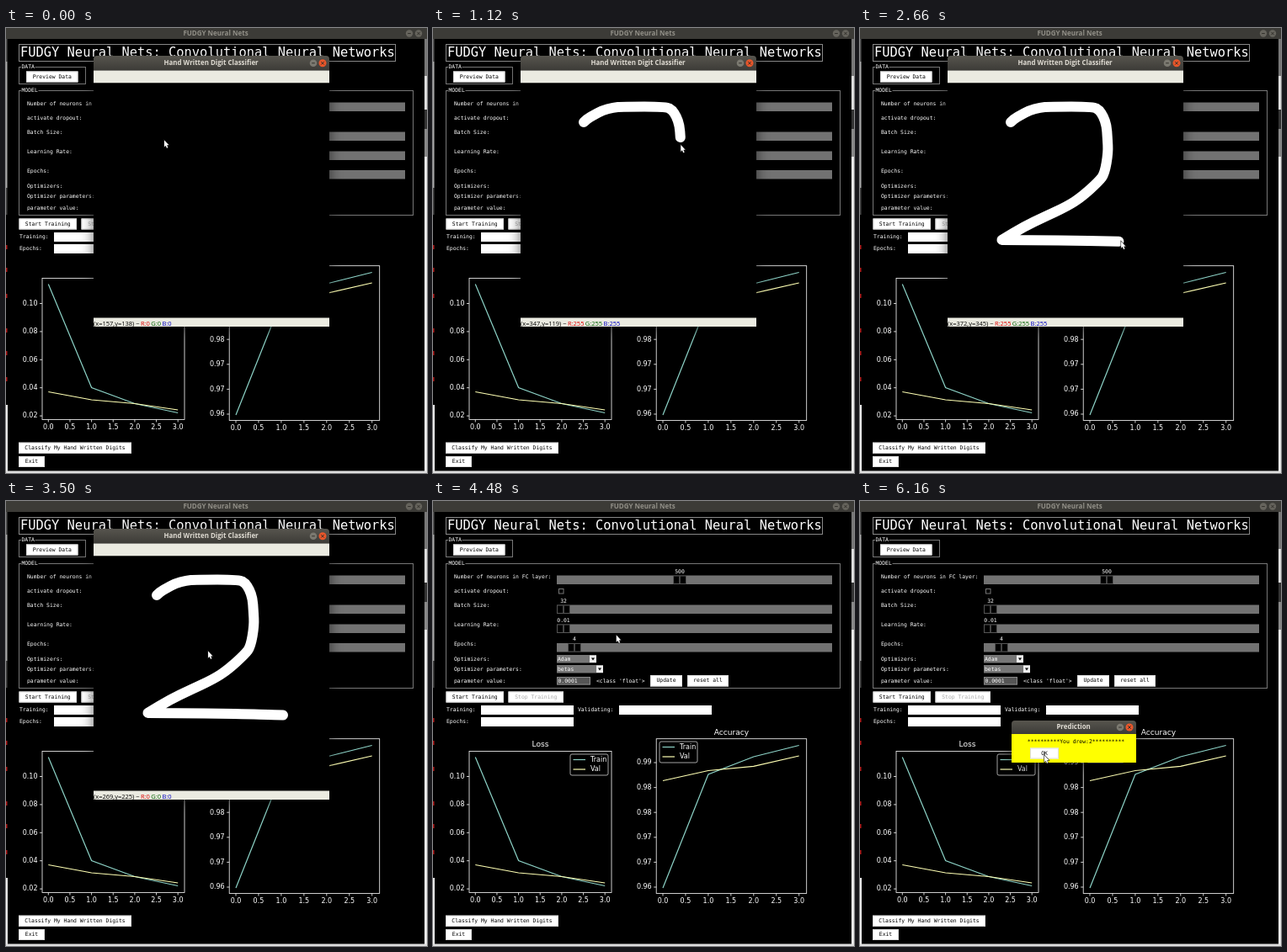
These frames come from a looping animation (500 px wide and 529 px high, 6370 ms). An HTML page with a canvas:

```html
<!DOCTYPE html>
<html lang="en">
<head>
<meta charset="utf-8">
<title>Digit classifier demo</title>
<style>
  html, body { margin: 0; width: 100%; height: 100%; overflow: hidden; background: #000; }
  canvas { display: block; width: 500px; height: 529px; }
</style>
</head>
<body>
<canvas id="stage"></canvas>
<script>
const W = 500, H = 529, LOOP = 6370, STEP = 70;
const canvas = document.getElementById('stage');
const ratio = window.devicePixelRatio || 1;
canvas.width = W * ratio;
canvas.height = H * ratio;
const ctx = canvas.getContext('2d');
ctx.scale(ratio, ratio);

const MONO = '"DejaVu Sans Mono", monospace';
const UI = '6.4px ' + MONO;
const PLOT = '8px "DejaVu Sans", sans-serif';
const PLOT_TITLE = '9.1px "DejaVu Sans", sans-serif';
const BAR = 'bold 7.9px "Open Sans", sans-serif';
const STATUS = '7.5px "Open Sans", sans-serif';
const TEAL = '#8dd3c7', YELLOW = '#feffb3', CREAM = '#ebebe1';

// Pen positions as [x, y, time]; the pointer runs slightly ahead of the ink.
const LEAD = 35, INK_START = 385, INK_END = 2940;
const PATH = [
  [189.86, 140.47, 0], [188, 133.5, 35], [188, 133.5, 70], [179, 112, 245],
  [179, 112, 385], [183, 108, 430], [191, 103.5, 490], [201, 98, 550],
  [214, 94.5, 620], [225, 93.5, 680], [277, 93.5, 900], [284, 97.5, 950],
  [289, 105, 1000], [292.8, 116, 1055], [293.8, 130.08, 1120],
  [294.8, 148, 1190], [290.5, 173, 1300], [284, 182, 1345], [263, 201, 1460],
  [246, 212, 1540], [218, 225, 1655], [195, 236, 1760], [168.5, 252, 1890],
  [168.5, 252, 2065], [235, 252.3, 2370], [307.4, 253.7, 2660], [329, 254.6, 2940],
  [329, 254.6, 3255], [217.8, 159.6, 3605], [217.8, 159.6, 5075],
  [211.5, 154.5, 5145], [187, 147, 5215], [187, 147, 5285],
  [213, 316, 5775], [219, 302.5, 5985]
];

function pointAt(t) {
  for (let i = 1; i < PATH.length; i++) {
    const [x0, y0, t0] = PATH[i - 1], [x1, y1, t1] = PATH[i];
    if (t <= t1) {
      const k = Math.max(0, (t - t0) / (t1 - t0));
      return [x0 + (x1 - x0) * k, y0 + (y1 - y0) * k];
    }
  }
  return PATH[PATH.length - 1];
}

function fill(x, y, w, h, color) {
  ctx.fillStyle = color;
  ctx.fillRect(x, y, w, h);
}

function frame(x, y, w, h, color, width = 1) {
  ctx.strokeStyle = color;
  ctx.lineWidth = width;
  ctx.strokeRect(x, y, w, h);
}

function text(str, x, y, font = UI, color = '#fff', align = 'left', base = 'middle') {
  ctx.font = font;
  ctx.fillStyle = color;
  ctx.textAlign = align;
  ctx.textBaseline = base;
  ctx.fillText(str, x, y);
}

function line(points, color, width) {
  ctx.beginPath();
  points.forEach(([x, y]) => ctx.lineTo(x, y));
  ctx.strokeStyle = color;
  ctx.lineWidth = width;
  ctx.stroke();
}

function disc(x, y, r, color) {
  ctx.beginPath();
  ctx.arc(x, y, r, 0, Math.PI * 2);
  ctx.fillStyle = color;
  ctx.fill();
}

function button(label, x, y, w, h, color = '#000') {
  fill(x, y, w, h, '#fff');
  frame(x + .5, y + .5, w - 1, h - 1, '#ddd');
  text(label, x + w / 2, y + h / 2, UI, color, 'center');
}

function group(label, x, y, w, h) {
  frame(x + .5, y + .5, w, h, '#777');
  fill(x + 3, y - 3, label.length * 3.9 + 1, 7, '#000');
  text(label, x + 3.5, y);
}

function slider(y, handle, value) {
  fill(147, y, 327, 10.5, '#727272');
  fill(handle, y, 16, 10.5, '#000');
  frame(handle + .5, y + .5, 15, 9.5, '#555');
  fill(handle + 7.5, y + 1, 1, 8.5, '#888');
  text(value, handle + 8, y - 4.5, UI, '#fff', 'center');
}

function combo(label, y, w) {
  fill(147, y, w, 9.5, '#777');
  text(label, 148, y + 5);
  fill(147 + w - 8, y + .5, 8, 8.5, '#eee');
  const x = 147 + w - 4;
  ctx.beginPath();
  ctx.moveTo(x - 2, y + 3.5);
  ctx.lineTo(x + 2, y + 3.5);
  ctx.lineTo(x, y + 6.5);
  ctx.fillStyle = '#000';
  ctx.fill();
}

function windowButton(x, y, r, color, kind) {
  disc(x, y, r, color);
  ctx.beginPath();
  ctx.moveTo(x - 1.8, y - (kind === 'x' ? 1.8 : 0));
  ctx.lineTo(x + 1.8, y + (kind === 'x' ? 1.8 : 0));
  if (kind === 'x') {
    ctx.moveTo(x + 1.8, y - 1.8);
    ctx.lineTo(x - 1.8, y + 1.8);
  }
  ctx.strokeStyle = '#33312c';
  ctx.lineWidth = 1;
  ctx.stroke();
}

function titleBar(label, x, y, w, h) {
  const g = ctx.createLinearGradient(0, y, 0, y + h);
  g.addColorStop(0, '#57554e');
  g.addColorStop(1, '#3c3b37');
  ctx.beginPath();
  ctx.roundRect(x, y, w, h, [4, 4, 0, 0]);
  ctx.fillStyle = g;
  ctx.fill();
  text(label, x + w / 2 - .4, y + h / 2, BAR, '#dfdbd2', 'center');
  windowButton(x + w - 19, y + h / 2, 4.3, '#7b7970', '-');
  windowButton(x + w - 8, y + h / 2, 4.5, '#e9562a', 'x');
}

function shadow(x, y, w, h) {
  ctx.save();
  ctx.shadowColor = 'rgba(0,0,0,.6)';
  ctx.shadowBlur = 14 * ratio;
  ctx.shadowOffsetY = 3 * ratio;
  fill(x, y + 4, w, h - 4, '#000');
  ctx.restore();
}

function legend(x, y) {
  ctx.beginPath();
  ctx.roundRect(x, y, 45, 25, 2);
  ctx.fillStyle = '#000';
  ctx.fill();
  ctx.strokeStyle = '#ccc';
  ctx.lineWidth = .8;
  ctx.stroke();
  [['Train', TEAL], ['Val', YELLOW]].forEach(([name, color], i) => {
    const ly = y + 6.5 + i * 11.5;
    line([[x + 3.5, ly], [x + 18, ly]], color, 1.2);
    text(name, x + 24, ly + .3, PLOT);
  });
}

function chart(p) {
  const { x, y, w, h } = p;
  const xs = [0, 1, 2, 3].map(i => p.x0 + i * p.dx);
  p.ticks.forEach((label, i) => {
    const ty = p.y0 + i * p.dy;
    line([[x - 3, ty], [x, ty]], '#fff', .8);
    text(label, x - 5.5, ty + .3, PLOT, '#fff', 'right');
  });
  for (let i = 0; i < 7; i++) {
    const tx = p.x0 + i * p.dx / 2;
    line([[tx, y + h], [tx, y + h + 3]], '#fff', .8);
    text((i / 2).toFixed(1), tx, y + h + 9.3, PLOT, '#fff', 'center');
  }
  line(xs.map((v, i) => [v, p.train[i]]), TEAL, 1.2);
  line(xs.map((v, i) => [v, p.val[i]]), YELLOW, 1.2);
  frame(x, y, w, h, '#fff', .8);
  text(p.title, x + w / 2, y - 7.5, PLOT_TITLE, '#fff', 'center');
  legend(p.lx, p.ly);
}

function desktopEdges() {
  fill(0, 12, 1.5, 28, '#555');
  fill(0, 40, 1.5, 150, '#aaa');
  fill(0, 190, 1.5, 32, '#444');
  [258, 285, 316, 357, 384, 415].forEach(y => fill(0, y, 1.5, 5, '#b01818'));
  fill(0, 448, 2, 81, '#e8e8e8');
  fill(497, 12, 3, 45, '#777');
  fill(497, 57, 3, 40, '#ddd');
  fill(497, 97, 3, 23, '#333');
  fill(497, 120, 3, 33, '#888');
  fill(497, 153, 3, 376, '#e8e8e8');
  fill(0, 526.5, 500, 2.5, '#e0e0e0');
}

function mainWindow() {
  fill(0, 0, W, H, '#000');
  desktopEdges();
  fill(0, 0, W, 13, '#3c3b37');
  text('FUDGY Neural Nets', 249, 6.5, 'bold 8px "Open Sans", sans-serif', '#918f87', 'center');
  windowButton(479, 6.5, 4.2, '#66645d', '-');
  windowButton(490, 6.5, 4.2, '#66645d', 'x');

  frame(15.5, 19.5, 447, 20, '#888');
  text('FUDGY Neural Nets: Convolutional Neural Networks', 17, 30, '15.4px ' + MONO);
  group('DATA', 15, 46, 79, 20);
  button('Preview Data', 24, 51.5, 61.5, 13);
  group('MODEL', 15, 74, 468, 148);

  [['Number of neurons in FC layer:', 90], ['activate dropout:', 107],
   ['Batch Size:', 124.5], ['Learning Rate:', 147.5], ['Epochs:', 170.5],
   ['Optimizers:', 188], ['Optimizer parameters:', 200], ['parameter value:', 214]
  ].forEach(([label, y]) => text(label, 25, y));

  slider(88.5, 285, '500');
  frame(149.5, 104.5, 5.5, 5.5, '#777');
  slider(123.5, 147, '32');
  slider(146.5, 147, '0.01');
  slider(169, 160, '4');
  combo('Adam', 183, 47);
  combo('betas', 195, 55);
  fill(147, 209, 40, 9.5, '#555');
  frame(147.5, 209.5, 39, 8.5, '#888');
  text('0.0001', 148.5, 214);
  text("<class 'float'>", 194, 214);
  button('Update', 258, 207, 38, 13.5);
  button('reset all', 302, 207, 49, 13.5);

  button('Start Training', 15.5, 226.5, 68.5, 13);
  button('Stop Training', 89.5, 226.5, 65.5, 13, '#aaa');
  text('Training:', 16, 248.5);
  text('Validating:', 172, 248.5);
  text('Epochs:', 16, 262.5);
  [[57, 243], [221, 243], [57, 257]].forEach(([x, y]) => fill(x, y, 110, 11, '#fff'));

  chart({
    title: 'Loss', x: 43, y: 297.5, w: 169, h: 168, x0: 50.3, dx: 51.3,
    ticks: ['0.10', '0.08', '0.06', '0.04', '0.02'], y0: 327.5, dy: 33.4,
    train: [304.5, 427.5, 446.5, 457.5], val: [432.5, 442, 446.5, 454], lx: 163, ly: 301
  });
  chart({
    title: 'Accuracy', x: 265.2, y: 282.7, w: 178.5, h: 183.8, x0: 273, dx: 53.9,
    ticks: ['0.99', '0.98', '0.98', '0.97', '0.97', '0.96'], y0: 311, dy: 29.6,
    train: [460, 325, 304, 290.5], val: [332.5, 320.5, 315.3, 303], lx: 269, ly: 286
  });

  button('Classify My Hand Written Digits', 15, 492.7, 134, 13);
  button('Exit', 15, 509, 31, 13);
}

// Rounds the bends by curving between the midpoints of the pen path.
function ink(t) {
  const end = Math.min(t, INK_END);
  const points = PATH.filter(p => p[2] >= INK_START && p[2] <= end);
  points.push(pointAt(end));
  ctx.beginPath();
  ctx.moveTo(points[0][0], points[0][1]);
  for (let i = 1; i < points.length - 1; i++) {
    const [x, y] = points[i], [nx, ny] = points[i + 1];
    ctx.quadraticCurveTo(x, y, (x + nx) / 2, (y + ny) / 2);
  }
  const [lastX, lastY] = points[points.length - 1];
  ctx.lineTo(lastX, lastY);
  ctx.lineCap = ctx.lineJoin = 'round';
  ctx.strokeStyle = '#fff';
  ctx.lineWidth = 12;
  ctx.stroke();
  ctx.lineCap = 'butt';
  ctx.lineJoin = 'miter';
}

function statusBar(t) {
  ctx.save();
  ctx.beginPath();
  ctx.rect(104, 344.5, 280, 10.5);
  ctx.clip();
  fill(104, 344, 280, 11, CREAM);
  const [px, py] = pointAt(t);
  const scale = 512 / 280;
  const level = t >= 420 && t < 3290 ? 255 : 0;
  const sx = Math.round((px - 104) * scale), sy = Math.round((py - 65) * scale);
  let x = 104;
  [[`(x=${sx},y=${sy}) ~`, '#000'], ['R:' + level, '#e00000'],
   ['G:' + level, '#006000'], ['B:' + level, '#0000c0']].forEach(([s, color]) => {
    text(s, x, 354.3, STATUS, color, 'left', 'alphabetic');
    x += ctx.measureText(s).width + 1.4;
  });
  ctx.restore();
}

function drawingWindow(t) {
  shadow(104, 33, 280, 322);
  titleBar('Hand Written Digit Classifier', 104, 33, 280, 17.5);
  fill(104, 50.5, 280, 15, CREAM);
  fill(104, 65.5, 280, 279, '#000');
  if (t >= 420) ink(t);
  statusBar(t);
}

function prediction() {
  shadow(180, 261, 148, 50);
  titleBar('Prediction', 180, 261, 148, 16);
  fill(180, 277, 148, 34, '#ff0');
  text('**********You drew:2**********', 256.5, 286.5, UI, '#000', 'center');
  button('OK', 202, 293.5, 34, 13);
}

// Draws a window slightly shrunk and see-through while it opens or closes.
function fading(alpha, scale, cx, cy, draw) {
  ctx.save();
  ctx.globalAlpha = alpha;
  ctx.translate(cx, cy);
  ctx.scale(scale, scale);
  ctx.translate(-cx, -cy);
  draw();
  ctx.restore();
}

function pointer(x, y) {
  ctx.beginPath();
  [[0, 0], [0, 7.8], [1.7, 6.3], [3, 9.2], [4.3, 8.6], [3.1, 5.8], [5.3, 5.6]]
    .forEach(([dx, dy]) => ctx.lineTo(x + dx, y + dy));
  ctx.closePath();
  ctx.strokeStyle = '#222';
  ctx.lineWidth = 1.2;
  ctx.stroke();
  ctx.fillStyle = '#fff';
  ctx.fill();
}

function render(t) {
  mainWindow();
  if (t < 4410) drawingWindow(t);
  else if (t < 4480) fading(.985, .996, 244, 194, () => drawingWindow(t));
  if (t >= 4690) prediction();
  else if (t >= 4620) fading(.75, .97, 254, 286, prediction);
  pointer(...pointAt(t + LEAD));
}

const start = performance.now();
function tick() {
  const t = (performance.now() - start) % LOOP;
  render(Math.floor(t / STEP) * STEP);
  requestAnimationFrame(tick);
}
tick();
</script>
</body>
</html>
```
